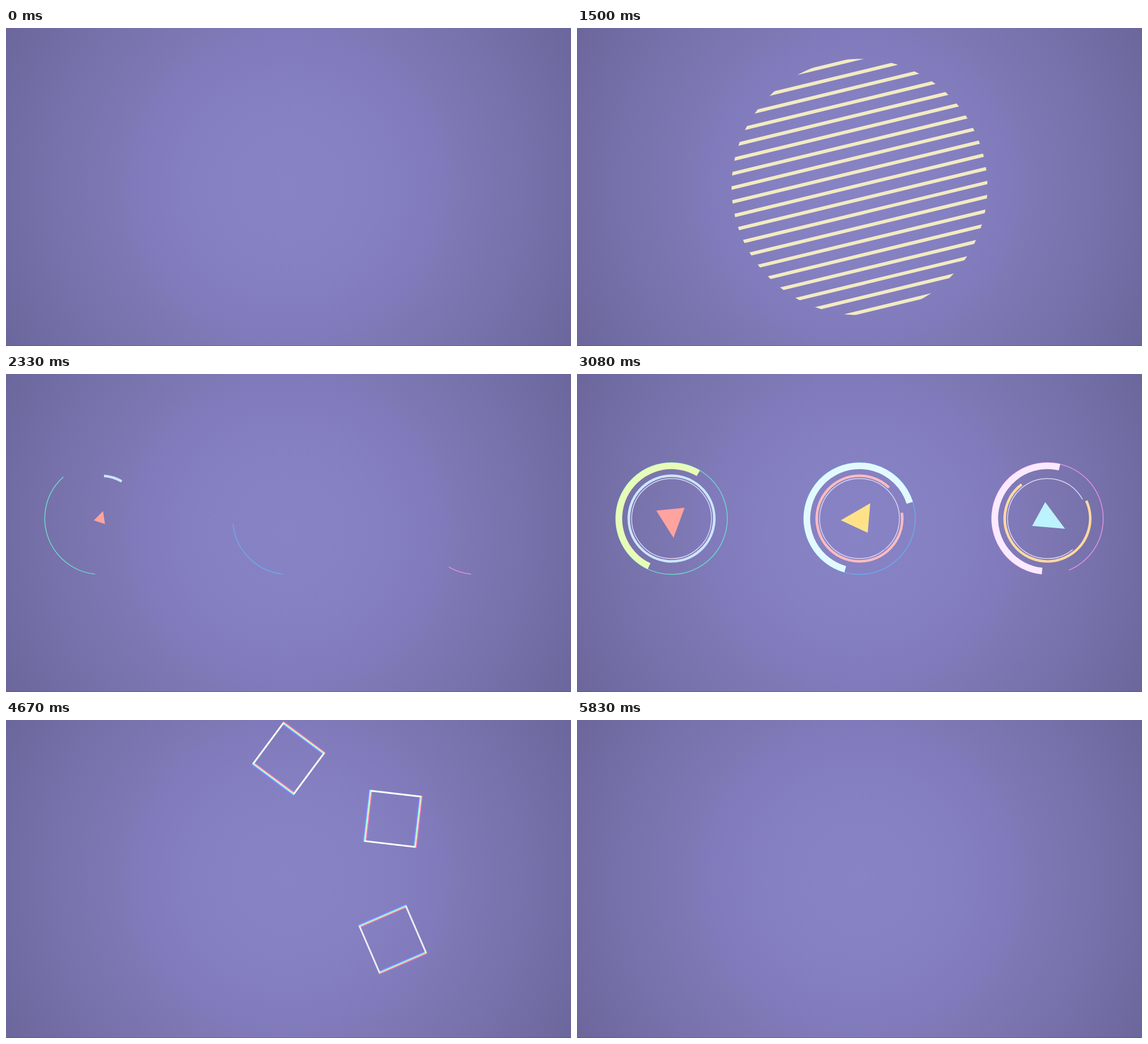
An HTML page for the animation above (5.87 s loop, 998x561 px).

```html
<!DOCTYPE html>
<html lang="en">
<head>
<meta charset="utf-8">
<title>Shape animation</title>
<style>
  html, body { margin: 0; width: 100%; height: 100%; overflow: hidden; background: #8079b8; }
  svg { display: block; width: 998px; height: 561px; }
  .channel { mix-blend-mode: screen; }
</style>
</head>
<body>
<svg viewBox="0 0 998 561">
  <defs>
    <radialGradient id="backdrop" gradientUnits="userSpaceOnUse" cx="499" cy="280" r="574">
      <stop offset="0" stop-color="#8883c5"/>
      <stop offset=".28" stop-color="#8580c1"/>
      <stop offset=".48" stop-color="#807abb"/>
      <stop offset=".53" stop-color="#7e78b4"/>
      <stop offset=".72" stop-color="#7772ab"/>
      <stop offset="1" stop-color="#6b669b"/>
    </radialGradient>
    <clipPath id="disc"><circle cx="499" cy="280.5" r="226"/></clipPath>
  </defs>
  <rect width="998" height="561" fill="url(#backdrop)"/>
  <rect y="560" width="998" height="1" fill="#3c3860" opacity=".3"/>
  <g id="scene"></g>
</svg>
<script>
const LOOP = 5870, FRAME = 1000 / 24, CREAM = '#f2ebc2';
const scene = document.getElementById('scene');
const clamp = (v, lo = 0, hi = 1) => Math.min(hi, Math.max(lo, v));
const ramp = (t, from, to) => clamp((t - from) / (to - from));

function streak(t) {
  const head = ramp(t, 390, 1000), tail = ramp(t, 850, 1400);
  if (head <= tail) return '';
  return `<path d="M0 561C180 300 300 480 450 330S700 60 901 100" pathLength="1" fill="none"
    stroke="${CREAM}" stroke-width="3" stroke-dasharray="${head - tail} 2" stroke-dashoffset="${-tail}"/>`;
}

// Blinds inside a disc turn while every slat widens.
function blinds(t) {
  if (t < 1360 || t >= 1995) return '';
  const pitch = 24.2, v = (t - 1500) / 291.7;
  const open = clamp(0.75 - 0.48 * v);
  let slats = '';
  for (let i = -10; i < 10; i++) {
    slats += `M-240 ${(i + open) * pitch}h480v${(1 - open) * pitch + (open ? 0 : 0.5)}h-480z`;
  }
  return `<g clip-path="url(#disc)"><path fill="${CREAM}" d="${slats}"
    transform="translate(499 280.5) rotate(${-13.6 - 37.6 * v})"/></g>`;
}

const dials = [
  { x: 167, start: 2010, thin: '#6fd3cb', thick: '#e7fcb8', mid: '#cbe6ff', tri: '#ffa39f',
    points: '-27,-14 23,-19 3.5,34' },
  { x: 499, start: 2140, thin: '#6ca9ec', thick: '#e2faff', mid: '#ffbcc0', tri: '#ffe288',
    points: '-33,3 19,-27 14.5,25' },
  { x: 831, start: 2274, thin: '#dc91e4', thick: '#fae9ff', mid: '#ffd9a2', tri: '#bdf2ff',
    points: '-4,-29 -27,13 31,18' }
];

function arc(radius, width, color, start, length) {
  if (length <= 0.2) return '';
  const dash = length < 360 ? `pathLength="360" stroke-dasharray="${length} 400"` : '';
  return `<circle r="${radius}" fill="none" stroke="${color}" stroke-width="${width}"
    ${dash} transform="rotate(${start})"/>`;
}

function dial(d, t) {
  const age = t - d.start;
  if (age <= 0 || age >= 1640) return '';
  const ring = (radius, width, color, start, from, to, gone) => {
    const cut = 360 * ramp(age, gone, gone + 380);
    return arc(radius, width, color, start + cut, 360 * ramp(age, from, to) - cut);
  };
  const size = Math.min(ramp(age, 200, 500), 1 - ramp(age, 1250, 1550));
  return `<g transform="translate(${d.x} 255)">` +
    ring(98.5, 1.6, d.thin, 95.6, 0, 878, 1260) +
    arc(93, 11.6, d.thick, 95.6 + 0.0735 * (age - 806), 237 - 0.0029 * (age - 940) ** 2) +
    ring(75.5, 4.6, d.mid, 335 + 0.125 * (age - 806), 271, 1024, 1220) +
    ring(70.5, 1.5, '#dcd5f1', 50.7, 330, 945, 1200) +
    `<polygon points="${d.points}" fill="${d.tri}"
      transform="rotate(${0.208 * (t - 3083)}) scale(${size})"/></g>`;
}

// Six repeated squares leave the centre and return, with split colour channels.
function squares(t) {
  if (t < 3990 || t >= 5825) return '';
  const out = 1 - (1 - ramp(t, 3990, 4750)) ** 2;
  const back = 1 - ramp(t, 4750, 5840) ** 1.586;
  const reach = 215 * out * back;
  const copies = 4.5 + (t - 5166.7) / 304;
  const spin = -26 + 0.0547 * (t - 5166.7);
  const size = Math.min(ramp(t, 3970, 4080), 1 - ramp(t, 5680, 5840));
  const channels = [['#00f', -2.2], ['#0f0', 0], ['#f00', 1.8]];
  let svg = '';
  for (let i = 0; i < 6; i++) {
    const alpha = clamp(copies - i);
    if (!alpha) continue;
    const turn = 60 * i;
    for (const [color, shift] of channels) {
      svg += `<rect class="channel" x="${shift - 44.7}" y="-44.7" width="89.4" height="89.4"
        fill="none" stroke="${color}" stroke-width="3" stroke-opacity="${alpha}"
        transform="translate(499 280.5) rotate(${turn}) translate(0 ${-reach}) rotate(${spin}) scale(${size})"/>`;
    }
  }
  return svg;
}

function draw(t) {
  scene.innerHTML = streak(t) + blinds(t) + dials.map(d => dial(d, t)).join('') + squares(t);
}

const began = performance.now();
function tick() {
  const time = (performance.now() - began) % LOOP;
  draw(Math.floor((time + 4) / FRAME) * FRAME);
  requestAnimationFrame(tick);
}
tick();
</script>
</body>
</html>
```
